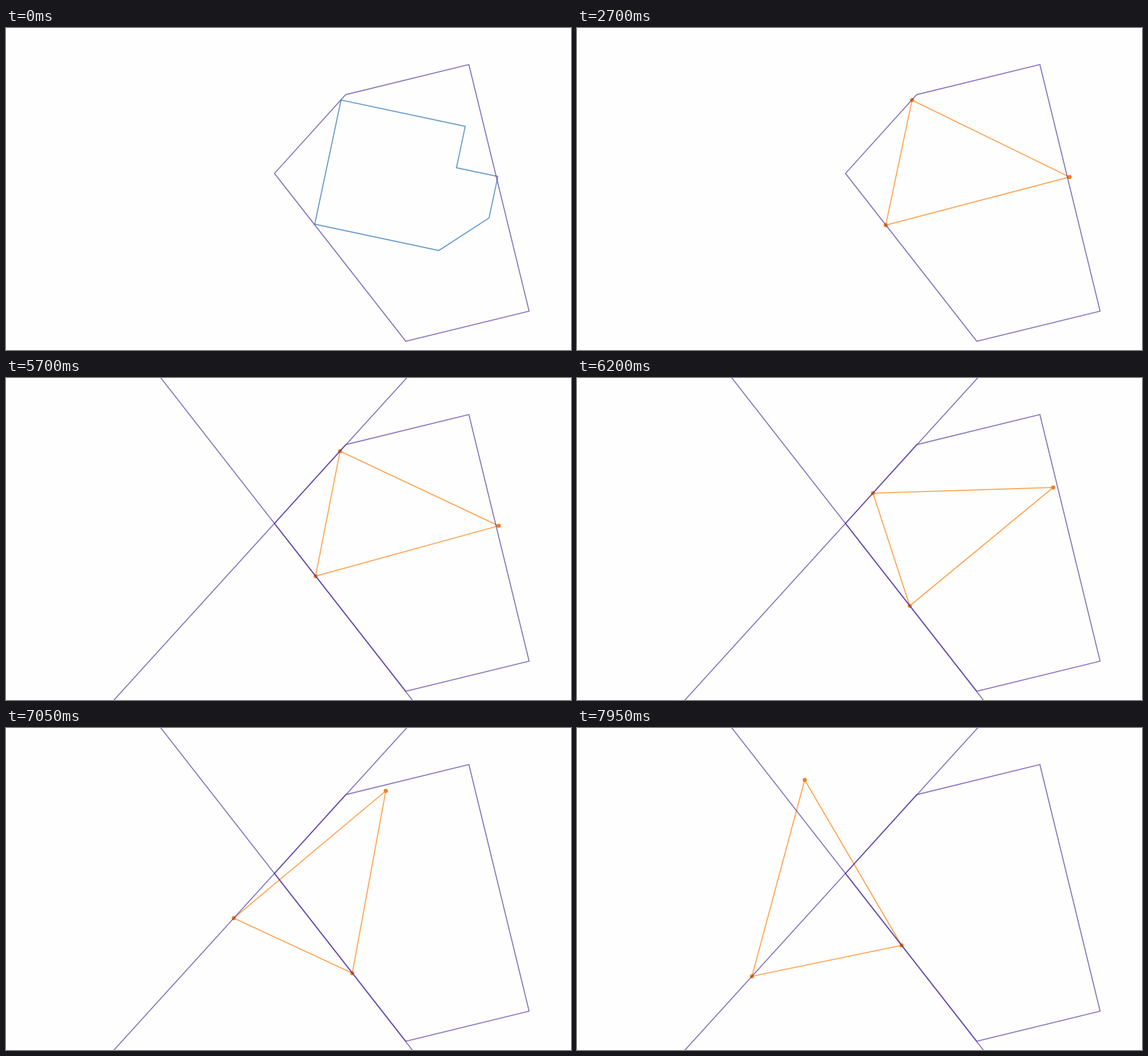
These frames come from a looping animation (991x565 px, 8 s). An HTML page with a canvas:

```html
<!DOCTYPE html>
<html lang="en">
<head>
<meta charset="utf-8">
<title>Sliding triangle</title>
<style>
  html, body { margin: 0; width: 100%; height: 100%; overflow: hidden; background: #fefefe; }
  canvas { display: block; }
</style>
</head>
<body>
<canvas id="stage" width="991" height="565"></canvas>
<script>
const ctx = document.getElementById('stage').getContext('2d');
const LOOP = 8000, TICK = 50, TURN = 0.042;
const PURPLE = 'rgba(80,50,160,.65)', BLUE = 'rgba(31,110,180,.68)';
const ORANGE = 'rgba(255,127,14,.7)', DOT = '#f57f17';

// Square grid: maps (i, j) to the stage, with (dx, dy) as one step along i
const grid = (x, y, dx, dy) => ([i, j]) => [x + i * dx - j * dy, y + i * dy + j * dx];

const shape = [[0, 0], [3, 0], [3, 1], [4, 1], [4, 2], [3, 3], [0, 3]]
  .map(grid(587.7, 126.4, 72.6, 15.4));
const box = [[0, 0], [1, 0], [1, 2], [0, 2]].map(grid(595.6, 117, 216.3, -52.8));
const pentagon = [...box, [470.9, 255.2]];

// The two guide lines, as x for a given y
const riseX = y => 702.6 - 0.9083 * y;
const fallX = y => 271.7 + 0.7803 * y;

// Two corners slide along the guides, the third follows an ellipse
function triangle(t) {
  const n = Math.floor((t - 5650) / TICK);
  const step = Math.max(0.7, n - Math.floor(n / 21)); // one tick in 21 repeats
  const wave = (mid, size, peak) => mid + size * Math.cos(TURN * (step - peak));
  const ax = wave(469.4, 181.5, -19.8);
  const by = wave(259.5, 171, 25.5);
  return [
    [ax, (702.6 - ax) / 0.9083],
    [fallX(by), by],
    [wave(478.3, 386, 1.7), wave(251.8, -163.5, 39.5)]
  ];
}

function path(points, color) {
  ctx.beginPath();
  points.forEach(p => ctx.lineTo(...p));
  ctx.closePath();
  ctx.strokeStyle = color;
  ctx.stroke();
}

function dot([x, y]) {
  ctx.beginPath();
  ctx.arc(x, y, 3.6, 0, 7);
  ctx.fillStyle = DOT;
  ctx.fill();
}

function guide(lineX) {
  ctx.beginPath();
  ctx.moveTo(lineX(-20), -20);
  ctx.lineTo(lineX(585), 585);
  ctx.strokeStyle = PURPLE;
  ctx.stroke();
}

function draw(t) {
  ctx.fillStyle = '#fefefe';
  ctx.fillRect(0, 0, 991, 565);
  ctx.lineWidth = 1.9;
  const corners = triangle(t);
  if (t < 2700) path(shape, BLUE);
  else path(corners, ORANGE);
  if (t >= 1150) corners.forEach(dot);
  path(pentagon, PURPLE);
  if (t >= 3850) guide(riseX);
  if (t >= 4500) guide(fallX);
}

const start = performance.now();
function frame(now) {
  draw(Math.max(0, now - start) % LOOP);
  requestAnimationFrame(frame);
}
draw(0);
requestAnimationFrame(frame);
</script>
</body>
</html>
```
